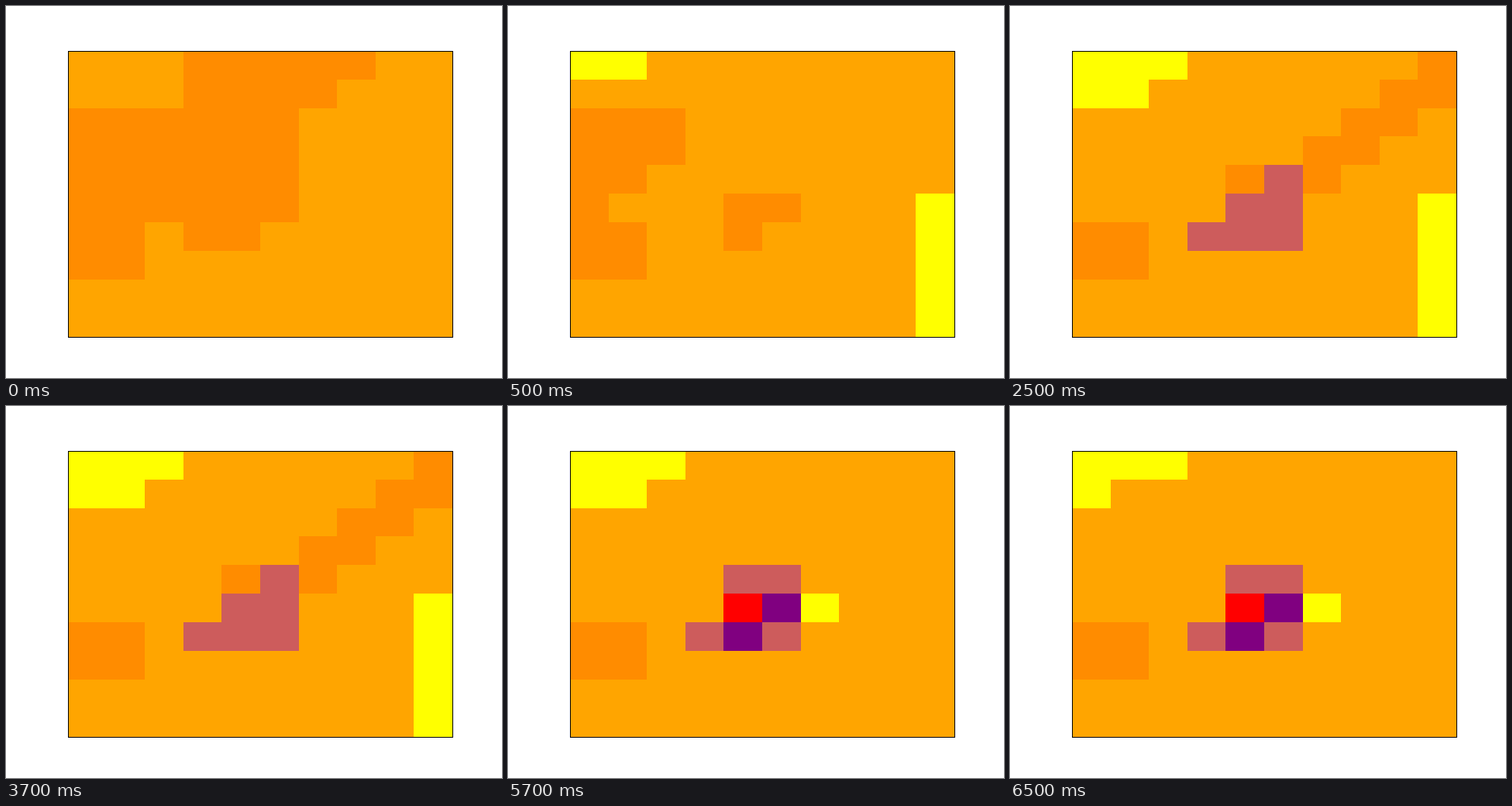
An HTML page with a canvas for the animation above (8000 ms loop, 640 px wide and 480 px high).

```html
<!DOCTYPE html>
<html lang="en">
<head>
<meta charset="utf-8">
<title>Cell grid</title>
<style>
  html, body { margin: 0; width: 100%; height: 100%; overflow: hidden; background: #fff; }
  canvas { display: block; }
</style>
</head>
<body>
<canvas id="stage" width="640" height="480"></canvas>
<script>
const ctx = document.getElementById('stage').getContext('2d');
const LOOP = 8000;
const N = 10;
const AREA = { x: 80, y: 57.6, w: 496, h: 369.6 };

const BASE = '#ffa500', DARK = '#ff8c00', YELLOW = '#ffff00';
const ROSE = '#cd5c5c', RED = '#ff0000', PURPLE = '#800080';

// Patches are [color, column, row, columns = 1, rows = 1].
const ember = [DARK, 0, 6, 2, 2];
const topStrip = [YELLOW, 0, 0, 3];
const rightStrip = [YELLOW, 9, 5, 1, 5];
const core = [
  topStrip, ember,
  [ROSE, 4, 4, 2], [ROSE, 3, 6, 3],
  [RED, 4, 5], [PURPLE, 5, 5], [PURPLE, 4, 6], [YELLOW, 6, 5]
];

const states = [
  { at: 0, patches: [
    ember, [DARK, 3, 0, 5], [DARK, 3, 1, 4], [DARK, 0, 2, 6, 4], [DARK, 3, 6, 2]
  ] },
  { at: 500, patches: [
    ember, rightStrip, [YELLOW, 0, 0, 2],
    [DARK, 0, 2, 3, 2], [DARK, 0, 4, 2], [DARK, 0, 5],
    [DARK, 4, 5, 2], [DARK, 4, 6]
  ] },
  { at: 2500, patches: [
    ember, rightStrip, topStrip, [YELLOW, 0, 1, 2],
    [DARK, 9, 0], [DARK, 8, 1, 2], [DARK, 7, 2, 2], [DARK, 6, 3, 2],
    [DARK, 6, 4], [DARK, 4, 4],
    [ROSE, 5, 4], [ROSE, 4, 5, 2], [ROSE, 3, 6, 3]
  ] },
  { at: 4500, patches: [...core, [YELLOW, 0, 1, 2]] },
  { at: 6500, patches: [...core, [YELLOW, 0, 1]] }
];

const edgeX = col => Math.round(AREA.x + AREA.w * col / N);
const edgeY = row => Math.round(AREA.y + AREA.h * row / N);

function fillCells(color, col, row, cols = 1, rows = 1) {
  const x = edgeX(col), y = edgeY(row);
  ctx.fillStyle = color;
  ctx.fillRect(x, y, edgeX(col + cols) - x, edgeY(row + rows) - y);
}

function draw(state) {
  ctx.fillStyle = '#fff';
  ctx.fillRect(0, 0, 640, 480);
  fillCells(BASE, 0, 0, N, N);
  state.patches.forEach(p => fillCells(...p));

  const x = edgeX(0), y = edgeY(0);
  ctx.strokeStyle = '#000';
  ctx.lineWidth = 1;
  ctx.strokeRect(x + 0.5, y + 0.5, edgeX(N) - x, edgeY(N) - y);
}

const start = performance.now();

function tick() {
  const t = (performance.now() - start) % LOOP;
  draw(states.filter(s => s.at <= t).pop());
  requestAnimationFrame(tick);
}
tick();
</script>
</body>
</html>
```
